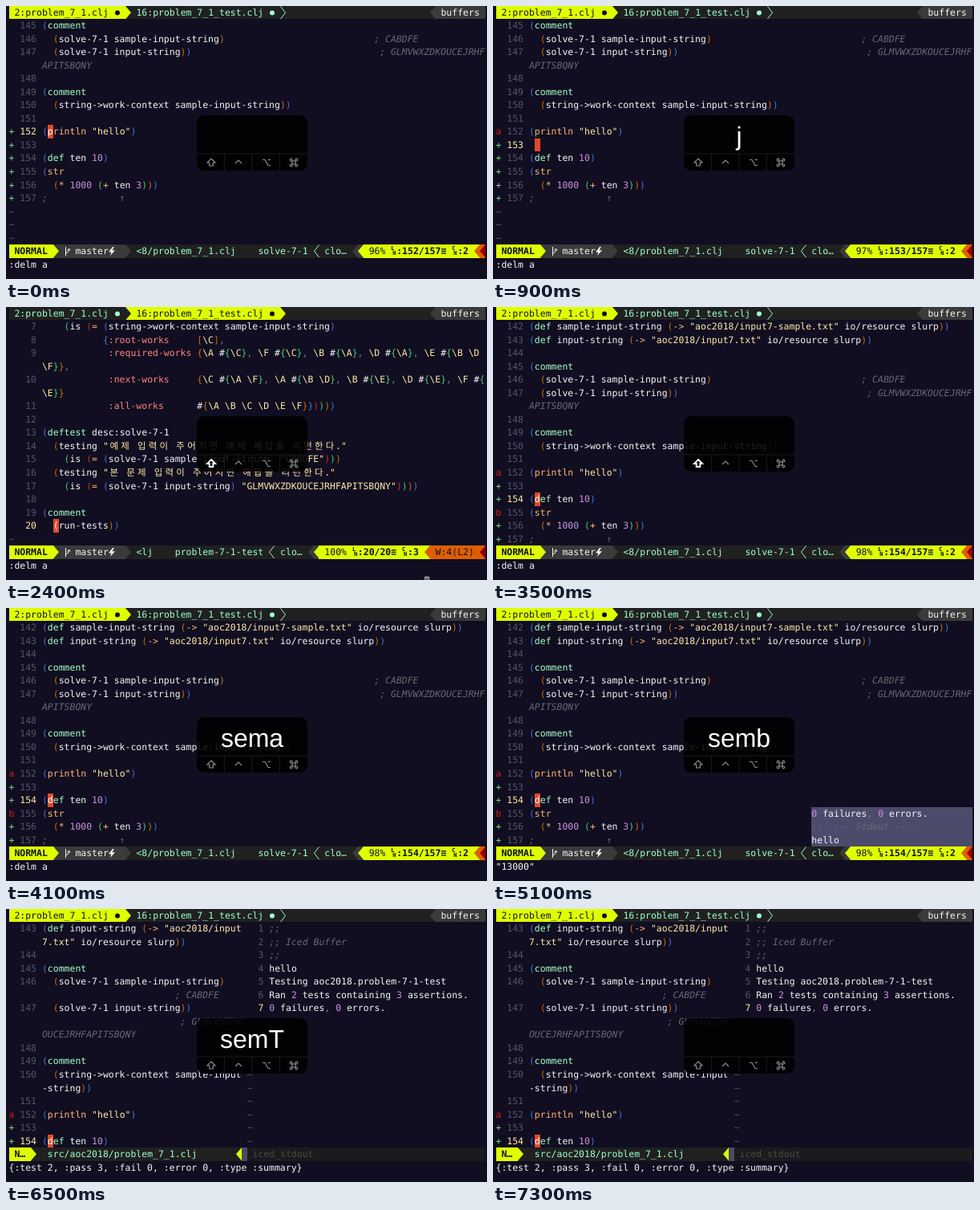
These frames come from a looping animation (600x340 px, 7.4 s). An HTML page:

```html
<!DOCTYPE html>
<html lang="en">
<head>
<meta charset="utf-8">
<title>Evaluating forms by mark</title>
<style>
html, body { margin: 0; width: 100%; height: 100%; overflow: hidden; background: #100e20; }
#stage { position: absolute; left: 0; top: 0; width: 600px; height: 340px; overflow: hidden;
  background: #100e20; color: #f4f4f8; font: 11.475px "DejaVu Sans Mono", monospace;
  text-rendering: geometricPrecision; font-variant-ligatures: none; }
#stage p, #stage div, #stage svg { position: absolute; margin: 0; }
#stage p { white-space: pre; line-height: 16.54px; }
#stage .tiny { font-size: 7px; font-weight: bold; line-height: 9px; color: #111; }
#stage .wide { display: inline-block; width: 13.82px; text-align: center; line-height: 1;
  font-family: "Noto Sans CJK KR", "Noto Sans CJK", sans-serif; }
#stage .pad { left: 238px; top: 136px; width: 138px; height: 69px; border-radius: 9px;
  background: rgba(0, 0, 0, .87); }
#stage .keys { left: 0; width: 138px; top: 6px; text-align: center; color: #fff;
  font: 32px/40px "Liberation Sans", Arial, sans-serif; }
</style>
</head>
<body>
<div id="stage"></div>
<script>
const CW = 6.91, LH = 16.54, X0 = 3.5, Y0 = -0.5, LOOP = 7400;
const YELLOW = '#dfff00', MINT = '#9cffd3', GREY = '#3a3a3a', DARK = '#202020', DIM = '#55546a';
const INK = '#10102a', WHITE = '#f4f4f8';
const RAINBOW = ['#4a6fdc', '#cd6a10', '#43cd80', '#c03030'];
const FORMS = /^(comment|def|deftest)$/, CALLS = /^(println|str|->|\*|\+|=)$/;

const CODE = `(def sample-input-string (-> "aoc2018/input7-sample.txt" io/resource slurp))
(def input-string (-> "aoc2018/input7.txt" io/resource slurp))

(comment
${'  (solve-7-1 sample-input-string)'.padEnd(60)}; CABDFE
${'  (solve-7-1 input-string))'.padEnd(61)}; GLMVWXZDKOUCEJRHFAPITSBQNY

(comment
  (string->work-context sample-input-string))

(println "hello")

(def ten 10)
(str
  (* 1000 (+ ten 3)))
;             ↑`;

const TEST = String.raw`    (is (= (string->work-context sample-input-string)
           {:root-works     [\C],
            :required-works {\A #{\C}, \F #{\C}, \B #{\A}, \D #{\A}, \E #{\B \D \F}},
            :next-works     {\C #{\A \F}, \A #{\B \D}, \B #{\E}, \D #{\E}, \F #{\E}}
            :all-works      #{\A \B \C \D \E \F}}))))

(deftest desc:solve-7-1
  (testing "예제 입력이 주어지면 예제 해답을 리턴한다."
    (is (= (solve-7-1 sample-input-string) "CABDFE")))
  (testing "본 문제 입력이 주어지면 해답을 리턴한다."
    (is (= (solve-7-1 input-string) "GLMVWXZDKOUCEJRHFAPITSBQNY"))))

(comment
  (run-tests))`;

const HELLO = ';;\n;; Iced Buffer\n;;\nhello';
const RESULT = HELLO + `
Testing aoc2018.problem-7-1-test
Ran 2 tests containing 3 assertions.
0 failures, 0 errors.`;
const POPUP = '0 failures, 0 errors.\n;; ---- Stdout ----\nhello';

// Each line becomes a list of [character, style] cells.
function highlight(text, depth = 0) {
  const token = /"[^"]*"|;.*|\\\w|:[\w-]+|[()[\]{}]|[\s,]+|[^\s()[\]{}",]+/g;
  const style = s => {
    if (/^[([{]/.test(s)) return 'color:' + RAINBOW[depth++ % 4];
    if (/^[)\]}]/.test(s)) return 'color:' + RAINBOW[(--depth + 4) % 4];
    if (s[0] === ';') return 'color:#686873;font-style:italic';
    if (s[0] === '"' || s[0] === '\\') return 'color:#ffe9aa';
    if (s[0] === ':') return 'color:#ff8080';
    if (s[0] === ',') return 'color:#77778a';
    if (/^\d+$/.test(s)) return 'color:#c991e1';
    if (FORMS.test(s)) return 'color:#a8ffc8';
    if (CALLS.test(s)) return 'color:#ffb378';
    return '';
  };
  return text.split('\n').map(line => (line.match(token) || []).flatMap(s => {
    const look = style(s);
    return [...s].map(ch => [ch, look]);
  }));
}

const code = highlight(CODE), test = highlight(TEST, 2);
const escape = s => s.replace(/&/g, '&amp;').replace(/</g, '&lt;');
const xOf = col => X0 + col * CW, yOf = row => row * LH + Y0;

const html = (col, row, body, css = '') =>
  `<p style="left:${xOf(col)}px;top:${yOf(row)}px;${css}">${body}</p>`;
const text = (col, row, s, color, css = '') => html(col, row, escape(s), `color:${color};${css}`);
const bar = (from, to, row, bg, rows = 1) =>
  `<div style="left:${xOf(from)}px;top:${yOf(row)}px;width:${(to - from) * CW + .2}px;height:${LH * rows}px;background:${bg}"></div>`;
const svg = (x, y, body, color, width = 1) =>
  `<svg width="16" height="18" style="left:${x}px;top:${y}px;overflow:visible" fill="none" stroke="${color}" stroke-width="${width}">${body}</svg>`;
const arrow = (col, row, color, left) => svg(xOf(col), yOf(row),
  `<path d="${left ? `M7 0L0 8.3L7 ${LH}` : `M0 0L7 8.3L0 ${LH}`}Z" fill="${color}"/>`, 'none');
const chevron = (col, row, left) => svg(xOf(col), yOf(row),
  `<path d="${left ? 'M6.5 .5L.5 8.3L6.5 16' : 'M.5 .5L6.5 8.3L.5 16'}"/>`, MINT);
const dot = (col, color) => svg(xOf(col), yOf(0), `<circle cx="4" cy="8.5" r="3" fill="${color}"/>`, 'none');
const tiny = (col, row, top) =>
  `<div class="tiny" style="left:${xOf(col)}px;top:${yOf(row) + 1}px">${top}</div>` +
  `<div class="tiny" style="left:${xOf(col) + 2}px;top:${yOf(row) + 6.5}px">N</div>`;

function cellsHtml(cells) {
  let out = '', look = null;
  for (const [ch, style] of cells) {
    if (style !== look) {
      if (look !== null) out += '</span>';
      out += `<span style="${style}">`;
      look = style;
    }
    out += /[가-힣]/.test(ch) ? `<span class="wide">${ch}</span>` : escape(ch);
  }
  return out + (look === null ? '' : '</span>');
}

function pane(lines, { first, start, width, cursor, column, signs }) {
  let out = '', row = 1;
  for (let i = start - first; i < lines.length && row < 18; i++) {
    const n = first + i, active = n === cursor, cells = lines[i];
    const sign = signs(n);
    if (sign) out += text(0, row, sign, sign === '+' ? '#7fe08a' : '#d01818');
    out += text(2, row, String(n).padStart(3), active ? '#ffe9aa' : DIM);
    if (active) out += bar(6 + column, 7 + column, row, '#e2492b');
    const shown = active ? cells.map((c, k) => k === column ? [c[0], 'color:#fff'] : c) : cells;
    for (let k = 0; k === 0 || k < shown.length; k += width) {
      if (row < 18) out += html(6, row, cellsHtml(shown.slice(k, k + width)));
      row++;
    }
  }
  for (; row < 18; row++) out += text(0, row, '~', DIM);
  return out;
}

function tabs(second) {
  const ink = on => on ? INK : MINT;
  return bar(0, 86, 0, DARK) +
    (second ? bar(21, 49, 0, YELLOW) + arrow(21, 0, DARK) + arrow(49, 0, YELLOW)
            : bar(0, 21, 0, YELLOW) + arrow(21, 0, YELLOW) + chevron(49, 0)) +
    text(1, 0, '2:problem_7_1.clj', ink(!second)) + dot(19, ink(!second)) +
    text(23, 0, '16:problem_7_1_test.clj', ink(second)) + dot(47, ink(second)) +
    arrow(76, 0, GREY, true) + bar(77, 86, 0, GREY) + text(78, 0, 'buffers', WHITE);
}

function status({ file, fn, fnCol, end, percent, pos, col, warning }) {
  const R = 18, bold = 'font-weight:bold', posCol = end + 2 + percent.length + 2;
  const tail = posCol + pos.length + 2;
  return bar(0, 86, R, DARK) + bar(8, 21, R, GREY) + arrow(21, R, GREY) +
    bar(0, 8, R, YELLOW) + arrow(8, R, YELLOW) + text(1, R, 'NORMAL', INK, bold) +
    svg(xOf(10), yOf(R), '<path d="M1.5 3V14M1.5 11Q5.5 10 5.5 6.5M3.5 7.5L5.5 5L7 7.5"/>', WHITE) +
    text(12, R, 'master', WHITE) +
    svg(xOf(18), yOf(R), `<path d="M5 3L0 9.5H3.4L2 14L8 7.3H4.3L7 3Z" fill="${WHITE}"/>`, 'none') +
    text(23, R, file, MINT) + text(fnCol, R, fn, MINT) +
    chevron(fnCol + fn.length + 1, R, true) + text(fnCol + fn.length + 3, R, 'clo…', MINT) +
    arrow(end - 1, R, GREY, true) + bar(end, end + 1, R, GREY) +
    arrow(end, R, YELLOW, true) + bar(end + 1, 85, R, YELLOW) +
    text(end + 2, R, percent, INK) + tiny(posCol - 1, R, 'L') +
    text(posCol, R, pos + '≡', INK, bold) +
    tiny(tail, R, 'C') + text(tail + 1, R, ':' + col, INK, bold) +
    (warning ? arrow(75, R, '#df5f00', true) + bar(76, 86, R, '#df5f00') + text(77, R, warning, INK)
             : arrow(84, R, '#df5f00', true) + bar(85, 86, R, '#df5f00')) +
    arrow(85, R, '#990000', true);
}

function sourceView(s) {
  const split = s.view === 'split';
  return pane(code, {
    first: 142, start: s.start, width: split ? 36 : 80, cursor: s.line, column: 1,
    signs: n => s.marks[n] || (n >= 152 ? '+' : '')
  }) + (split ? splitView(s) : status({
    file: '<8/problem_7_1.clj', fn: 'solve-7-1', fnCol: 45, end: 63,
    percent: Math.floor(100 * s.line / 157) + '%', pos: `:${s.line}/157`, col: 2
  }));
}

function splitView(s) {
  const lines = highlight(s.output);
  let out = '';
  for (let row = 1; row < 18; row++) {
    if (row > lines.length) { out += text(43, row, '~', DIM); continue; }
    out += text(45, row, String(row), row === lines.length ? '#ffe9aa' : DIM) +
      html(47, row, cellsHtml(lines[row - 1]));
  }
  return out + bar(0, 42, 18, DARK) + bar(0, 4, 18, YELLOW) + arrow(4, 18, YELLOW) +
    text(1, 18, 'N…', INK, 'font-weight:bold') +
    text(7, 18, 'src/aoc2018/problem_7_1.clj', MINT) + arrow(41, 18, YELLOW, true) +
    bar(42, 43, 18, '#4b4a62') + bar(43, 86, 18, '#1b1b1d') + text(44, 18, 'iced_stdout', '#4a4a4a');
}

function testView(s) {
  return pane(test, {
    first: 7, start: 7, width: 80, cursor: 20, column: 2, signs: n => s.testMark && n === 20 ? 'T' : ''
  }) + status({
    file: '<lj', fn: 'problem-7-1-test', fnCol: 30, end: 55,
    percent: '100%', pos: ':20/20', col: 3, warning: 'W:4(L2)'
  });
}

const popup = () => bar(57, 86, 15, '#4d4b6b', 3) +
  highlight(POPUP).map((cells, i) => html(57, 15 + i, cellsHtml(cells))).join('');

function keypad({ keys, shift }) {
  const icons = [
    'M0-5L5 0H2.3V4H-2.3V0H-5Z',
    'M-4 1L0-3L4 1',
    'M-5-3.5H-2L2 3.5H5M1.5-3.5H5',
    'M-2-2H2V2H-2ZM-2-2H-3.3A1.4 1.4 0 1 1-2-3.3ZM2-2V-3.3A1.4 1.4 0 1 1 3.3-2ZM2 2H3.3A1.4 1.4 0 1 1 2 3.3ZM-2 2V3.3A1.4 1.4 0 1 1-3.3 2Z'
  ];
  const marks = icons.map((d, i) => {
    const lit = shift && i === 0;
    return svg(17.5 + i * 34.5, 58.5, `<path d="${d}"/>`, lit ? '#fff' : '#8c8c8c', lit ? 1.9 : 1.2);
  }).join('');
  return `<div class="pad"><p class="keys">${keys}</p>` +
    svg(0, 0, '<path d="M0 48H138M34.5 48V69M69 48V69M103.5 48V69"/>', '#1a1a1a') + marks + '</div>';
}

const A = { 152: 'a' }, AB = { 152: 'a', 155: 'b' };
const STEPS = [
  [0, { view: 'source', start: 145, line: 152, marks: {}, keys: '', shift: 0, cmd: ':delm a', pending: '' }],
  [400, { keys: 'm', pending: 'm' }],
  [500, { keys: 'ma', pending: '', marks: A }],
  [900, { keys: 'j', line: 153 }],
  [1000, { keys: 'jj', line: 154 }],
  [1100, { keys: 'jjj', line: 155 }],
  [1300, { keys: 'm', pending: 'm' }],
  [1400, { keys: 'mb', pending: '', marks: AB }],
  [1800, { keys: '', shift: 1 }],
  [2100, { view: 'test' }],
  [2400, { pending: 'm' }],
  [2500, { keys: 'mT', pending: '', testMark: 1 }],
  [2900, { keys: '' }],
  [3100, { view: 'source', start: 142, line: 154 }],
  [3600, { shift: 0 }],
  [3800, { keys: 's', pending: 's' }],
  [3900, { keys: 'se', pending: 'se' }],
  [4000, { keys: 'sem', pending: 'sem' }],
  [4100, { keys: 'sema', pending: '' }],
  [4200, { cmd: 'nil', popup: 1 }],
  [4500, { keys: '' }],
  [4700, { keys: 's', pending: 's' }],
  [4800, { keys: 'se', pending: 'se' }],
  [4900, { keys: 'sem', pending: 'sem' }],
  [5000, { keys: 'semb', pending: '', cmd: '"13000"' }],
  [5400, { keys: '' }],
  [5600, { keys: 's', pending: 's' }],
  [5700, { keys: 'sr', pending: 'sr' }],
  [5800, { keys: 'srr', pending: '', popup: 0, view: 'split', start: 143, output: HELLO }],
  [6100, { keys: 's', pending: 's' }],
  [6200, { keys: 'se', pending: 'se' }],
  [6300, { keys: 'sem', pending: 'sem', shift: 1 }],
  [6400, { keys: 'semT', pending: '' }],
  [6500, { shift: 0, cmd: '{:test 2, :pass 3, :fail 0, :error 0, :type :summary}', output: RESULT }],
  [6900, { keys: '' }]
];

const stage = document.getElementById('stage');
let shown = -1;

function frame() {
  const t = performance.now() % LOOP;
  const count = STEPS.filter(([at]) => at <= t).length;
  if (count !== shown) {
    shown = count;
    const s = Object.assign({}, ...STEPS.slice(0, count).map(([, change]) => change));
    stage.innerHTML = (s.view === 'test' ? testView(s) : sourceView(s)) + tabs(s.view === 'test') +
      (s.popup ? popup() : '') + text(0, 19, s.cmd, WHITE) +
      text(75, 20, s.pending, WHITE) + keypad(s);
  }
  requestAnimationFrame(frame);
}
frame();
</script>
</body>
</html>
```
